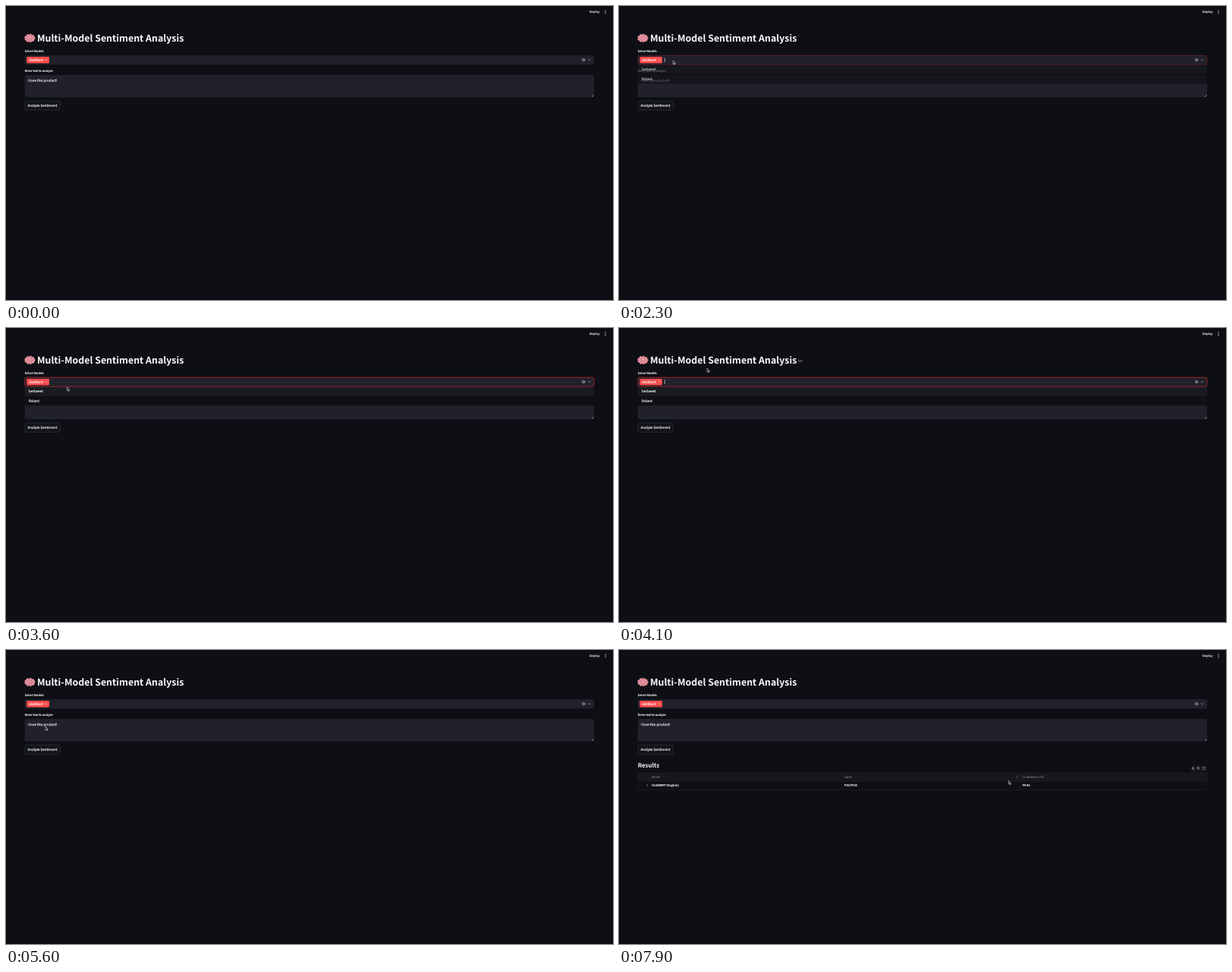
Write an HTML page that moves like this. It is 800x388 px and loops after 8000 ms.

```html
<!DOCTYPE html>
<html lang="en">
<head>
<meta charset="utf-8">
<title>Multi-Model Sentiment Analysis</title>
<style>
  html, body { margin: 0; width: 100%; height: 100%; overflow: hidden; background: #0d0f14; }
  svg { display: block; width: 800px; height: 388px; }
  text { font: 4.48px "Noto Sans CJK SC", "Noto Sans CJK JP", "Open Sans", sans-serif; fill: #fafafa; stroke: #fafafa; stroke-width: .14; text-rendering: geometricPrecision; }
  .small { font-size: 3.92px; }
  .h1 { font-size: 12.4px; font-weight: 700; stroke: none; }
  .h3 { font-size: 7.85px; font-weight: 700; stroke: none; }
  .dim { fill: #9a9ba1; stroke: none; }
  .field { fill: #20212a; }
  .line, .dots { fill: none; stroke: #c4c5c9; stroke-width: .55; stroke-linecap: round; stroke-linejoin: round; }
  .dots { stroke-width: 1.2; }
  .grid { fill: none; stroke: #22242b; stroke-width: .5; }
  #brain { fill: #efa0ac; stroke: #b25c6c; stroke-width: .5; }
</style>
</head>
<body>
<svg viewBox="0 0 800 388">
  <!-- top bar -->
  <g id="running">
    <circle class="line" cx="744" cy="7.4" r="1.8"/>
    <text class="small" x="753" y="8.9">Stop</text>
  </g>
  <text class="small" style="font-size: 4.1px" x="769" y="8.9">Deploy</text>
  <path class="dots" style="stroke: #fafafa" d="M790 5.6h0m0 1.9h0m0 1.9h0"/>

  <!-- title -->
  <g id="brain"></g>
  <text class="h1" x="41" y="47">Multi-Model Sentiment Analysis</text>
  <path id="link" class="line" d="M238.2 42.4h-.9a1.2 1.2 0 0 0 0 2.4h.9m1.4-2.4h.9a1.2 1.2 0 0 1 0 2.4h-.9m-1.7-1.2h2"/>

  <!-- model picker -->
  <text class="small" x="24.8" y="60.9">Select Models</text>
  <rect class="field" x="24.6" y="65" width="750.5" height="12.4" rx="2.5"/>
  <rect x="27.2" y="66.9" width="29.8" height="8.5" rx="1.3" fill="#ff4b4b"/>
  <text x="30" y="72.7">distilbert</text>
  <path class="line" d="M52.2 70.3l1.6 1.6m0-1.6l-1.6 1.6"/>
  <circle class="line" cx="761.2" cy="71.1" r="1.8"/>
  <path class="line" d="M760.6 70.5l1.2 1.2m0-1.2l-1.2 1.2m6.8-1.2l1.4 1.3l1.4-1.3"/>
  <rect id="focus" x="24.8" y="65.2" width="750.3" height="12.1" rx="2.4" fill="none" stroke="#d3262b" stroke-width=".7"/>
  <rect id="caret" x="59.9" y="68.2" width=".6" height="5.8" fill="#fafafa"/>

  <!-- text input -->
  <text class="small" x="24.8" y="87.3">Enter text to analyze</text>
  <rect class="field" x="24.6" y="91.1" width="750.5" height="29.4" rx="2.5"/>
  <path class="line" d="M772.4 119.4l1.8-1.8m-.6 1.8l.6-.6"/>
  <text x="28.7" y="100.1">I love this product!</text>

  <g id="menu">
    <rect x="24.6" y="78" width="750.5" height="24.3" fill="#0e1015"/>
    <rect x="24.6" y="78" width="750.5" height="11.8" fill="#191b21"/>
    <text x="29.9" y="85.1">bertweet</text>
    <text x="29.9" y="97.6">finbert</text>
  </g>

  <rect id="button" x="24.8" y="125.2" width="46.7" height="12.3" rx="2.5" stroke="#383a42" stroke-width=".5"/>
  <text x="28.6" y="133.1">Analyze Sentiment</text>

  <!-- results -->
  <g id="results">
    <text class="h3" x="24.8" y="154.8">Results</text>
    <rect x="24.8" y="162.3" width="750.2" height="11" fill="#16181e"/>
    <path class="grid" d="M24.8 162.3h750.2v22.2h-750.2zv11h750.2M40.6 162.3v22.2M294.6 162.3v22.2M529.6 162.3v22.2"/>
    <text class="small dim" y="169.2"><tspan x="43.2">Model</tspan><tspan x="297">Label</tspan><tspan x="531.8">Confidence (%)</tspan></text>
    <text class="small dim" x="36" y="180.2">0</text>
    <text class="small" y="180.2"><tspan x="43.2">DistilBERT (English)</tspan><tspan x="297">POSITIVE</tspan><tspan x="531.8">99.86</tspan></text>
  </g>
  <g id="tools">
    <rect x="752.6" y="152" width="22.4" height="8.4" rx="1.5" fill="#13151b"/>
    <path class="line" d="M756.5 154.4v2m-.9-.7l.9.9l.9-.9m-2.2 1.7h2.6m6.2-.8l1.1 1.1"/>
    <circle class="line" cx="763" cy="155.6" r="1.2"/>
    <rect class="line" x="769.3" y="154.5" width="3" height="3.2" stroke-dasharray="1.6"/>
  </g>
  <path id="columnMenu" class="dots" style="stroke: #85868c; stroke-width: .8" d="M524.5 166.1h0m0 1.5h0m0 1.5h0"/>

  <path id="pointer" fill="#08090c" stroke="#f4f4f4" stroke-width=".55" stroke-linejoin="round" d="M0 0v4.7l1.1-1l.8 1.8l.8-.4l-.8-1.7h1.5z"/>
</svg>
<script>
  const LOOP = 8000, STEP = 100, FADE = 300;
  const el = id => document.getElementById(id);
  const clamp = v => Math.min(1, Math.max(0, v));
  const smooth = p => p * p * (3 - 2 * p);
  const easeOut = p => 1 - (1 - p) ** 3;
  const between = (t, from, to) => t >= from && t < to;
  const setOpacity = (id, value) => el(id).setAttribute('opacity', value);

  // Pink folds: an outer ring of lobes, then an inner one.
  function drawBrain() {
    for (const [count, reach] of [[9, 1], [4, .4]]) {
      for (let i = 0; i < count; i++) {
        const a = i / count * 2 * Math.PI;
        const x = 31.4 + 5 * reach * Math.cos(a), y = 42.4 + 3.5 * reach * Math.sin(a);
        el('brain').innerHTML += `<circle cx="${x}" cy="${y}" r="2"/>`;
      }
    }
  }

  // The pointer rests between moves.
  const home = { x: 236, y: 142 };
  const moves = [
    { from: 500, to: 1500, x: 71.2, y: 72 },
    { from: 2600, to: 3000, x: 69, y: 77.3 },
    { from: 3000, to: 3600, x: 80.6, y: 78 },
    { from: 3600, to: 4200, x: 119, y: 51.3 },
    { from: 4700, to: 5400, x: 52, y: 101 },
    { from: 5600, to: 6200, x: 47.6, y: 130 },
    { from: 6600, to: 7500, x: 430, y: 190 },
    { from: 7500, to: 7900, x: 513.4, y: 172.4 }
  ];
  function pointerAt(t) {
    return moves.reduce((at, m) => {
      const p = smooth(clamp((t - m.from) / (m.to - m.from)));
      return { x: at.x + (m.x - at.x) * p, y: at.y + (m.y - at.y) * p };
    }, home);
  }

  const fades = {
    menu: { from: 2200, to: 4400 },
    focus: { from: 2250, to: 4800 },
    link: { from: 4000, to: 4800 },
    running: { from: 6480, to: 6900 },
    tools: { from: 7500, to: LOOP }
  };
  const fadeAt = (t, { from, to }) =>
    easeOut(clamp((t - from) / FADE)) * (1 - easeOut(clamp((t - to) / FADE)));

  function draw(now) {
    const t = Math.floor(now % LOOP / STEP) * STEP;
    for (const id in fades) setOpacity(id, fadeAt(t, fades[id]));

    const { x, y } = pointerAt(t);
    el('pointer').setAttribute('transform', `translate(${x} ${y})`);
    setOpacity('pointer', +(t >= 600));

    const blinkOn = (t + 10) % 1000 < 500;
    setOpacity('caret', +(between(t, 2300, 4500) && blinkOn));
    el('button').setAttribute('fill', between(t, 6000, 6800) ? '#1f2129' : '#12141a');
    setOpacity('results', +(t >= 6900));
    setOpacity('columnMenu', +(t >= 7900));
  }

  const start = performance.now();
  function tick() {
    draw(performance.now() - start);
    requestAnimationFrame(tick);
  }
  drawBrain();
  tick();
</script>
</body>
</html>
```
